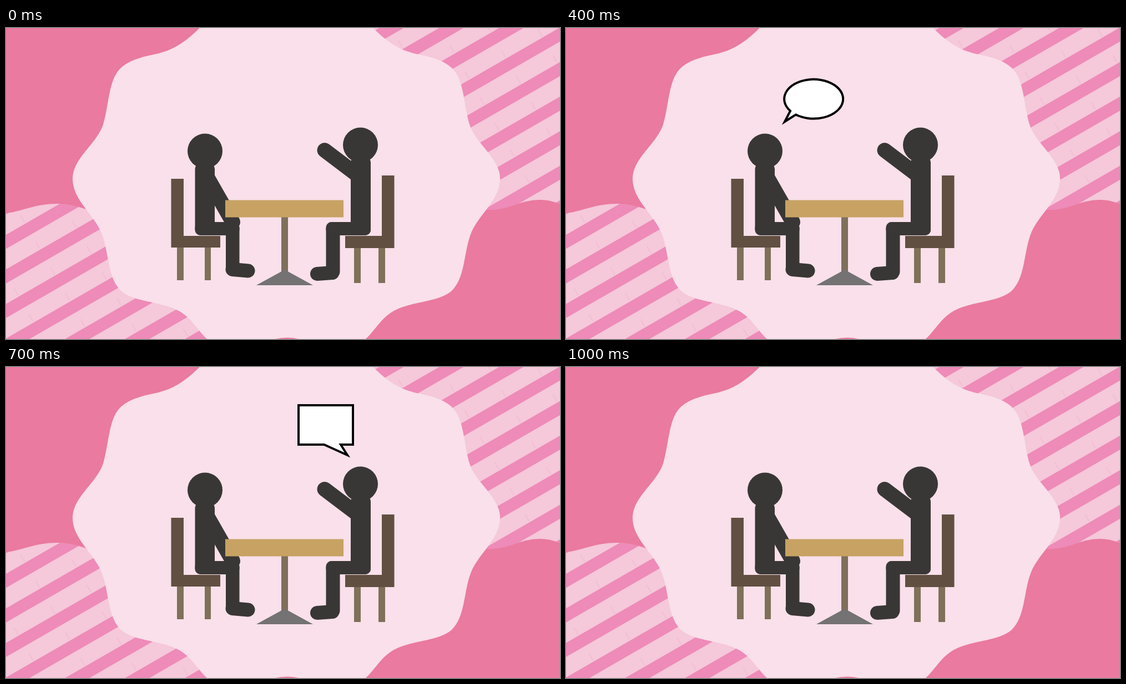
Write an HTML page that moves like this. It is 998 px wide and 561 px high and loops after 1200 ms.

```html
<!DOCTYPE html>
<html lang="en">
<head>
<meta charset="utf-8">
<title>Conversation at a table</title>
<style>
  html, body { margin: 0; width: 100%; height: 100%; overflow: hidden; background: #ea7a9f; }
  svg { display: block; width: 100%; height: 100%; }
</style>
</head>
<body>
<svg viewBox="0 0 998 561">
  <defs>
    <pattern id="stripesRight" width="76" height="54" patternUnits="userSpaceOnUse" patternTransform="translate(998 -1) rotate(-30)">
      <rect width="76" height="54" fill="#f5c8da"/>
      <rect width="76" height="22" fill="#ee8bb8"/>
      <path d="M40 37v15" stroke="#efb5cf"/>
    </pattern>
    <pattern id="stripesLeft" width="76" height="54" patternUnits="userSpaceOnUse" patternTransform="translate(0 373) rotate(-30)">
      <rect width="76" height="54" fill="#f5c8da"/>
      <rect width="76" height="22" fill="#ee8bb8"/>
      <path d="M40 37v15" stroke="#efb5cf"/>
    </pattern>
  </defs>

  <rect width="998" height="561" fill="#ea7a9f"/>
  <path fill="url(#stripesRight)" d="M600 0H998V318C972 306 945 309 920 318C900 325 885 329 865 328L600 200Z"/>
  <path fill="url(#stripesLeft)" d="M0 334C30 331 50 317 95 317C115 317 130 322 150 329L400 561H0Z"/>
  <g fill="#f9e0ea">
    <path id="halfBlob" d="M349 0C320 28 300 40 270 47C240 53 218 60 204 75C184 97 185 145 174 177C161 211 120 236 120 272C120 312 162 338 174 375C186 410 183 450 207 474C232 496 282 492 316 513C336 526 345 545 362 561H506V0Z"/>
    <use href="#halfBlob" transform="translate(1010) scale(-1 1)"/>
  </g>
  <path fill="#ea7a9f" d="M484 561Q507 556 528 561Z"/>

  <g id="chairs">
    <path fill="#7f705a" d="M308 396h12v59h-12zM358 396h11v59h-11zM627 396h12v64h-12zM671 396h12v64h-12z"/>
    <path fill="#614f41" d="M297.500 272h22.500v103h66v21h-88.500zM677 266h22.500v131h-88.500v-22h66z"/>
  </g>

  <g id="people" fill="#393735" stroke="#393735" stroke-linecap="round">
    <g stroke="none">
      <circle cx="358.500" cy="222" r="31.500"/>
      <rect x="340.500" y="244" width="35.500" height="130" rx="10"/>
      <rect x="340.500" y="350" width="80" height="24" rx="10"/>
      <rect x="396" y="350" width="24.500" height="94" rx="10"/>
      <circle cx="638.500" cy="211" r="31.500"/>
      <rect x="621" y="232" width="36" height="142" rx="10"/>
      <rect x="576.500" y="350" width="80.500" height="24" rx="10"/>
      <rect x="576.500" y="350" width="25" height="100" rx="10"/>
    </g>
    <path stroke-width="27" d="M363.500 271L408.500 350"/>
    <path stroke-width="25" d="M408 435.500L436 438"/>
    <path stroke-width="27" d="M574 220.500L636 267.500"/>
    <path stroke-width="25" d="M560.500 443.500L588 441.500"/>
  </g>

  <g id="table">
    <path fill="#7f705a" d="M496 341h12v100h-12z"/>
    <path fill="#747272" d="M502 436L553 464H451Z"/>
    <path fill="#c7a263" d="M395 310.500h213v31h-213z"/>
  </g>

  <g fill="#fff" stroke="#000" stroke-width="4" stroke-miterlimit="10">
    <path id="roundBubble" d="M404 177.600A53 35.500 0 1 1 414 184.300L394 197Z"/>
    <path id="squareBubble" d="M527 58H625V129H603L615 148L573 129H527Z"/>
  </g>
</svg>
<script>
  const LOOP = 1200, STEP = 100;
  // Vertical offsets, one per step, from the first step in which each bubble is seen.
  const bubbles = [
    { node: document.getElementById("roundBubble"), first: 1, rise: [15, 0, -17, -28, -37] },
    { node: document.getElementById("squareBubble"), first: 6, rise: [18, 11, 5, 0] }
  ];

  function draw(time) {
    const step = Math.floor((time % LOOP) / STEP);
    for (const { node, first, rise } of bubbles) {
      const y = rise[step - first];
      node.setAttribute("visibility", y === undefined ? "hidden" : "visible");
      node.setAttribute("transform", `translate(0 ${y ?? 0})`);
    }
  }

  const start = performance.now();
  function tick() {
    draw(performance.now() - start);
    requestAnimationFrame(tick);
  }
  draw(0);
  requestAnimationFrame(tick);
</script>
</body>
</html>
```
